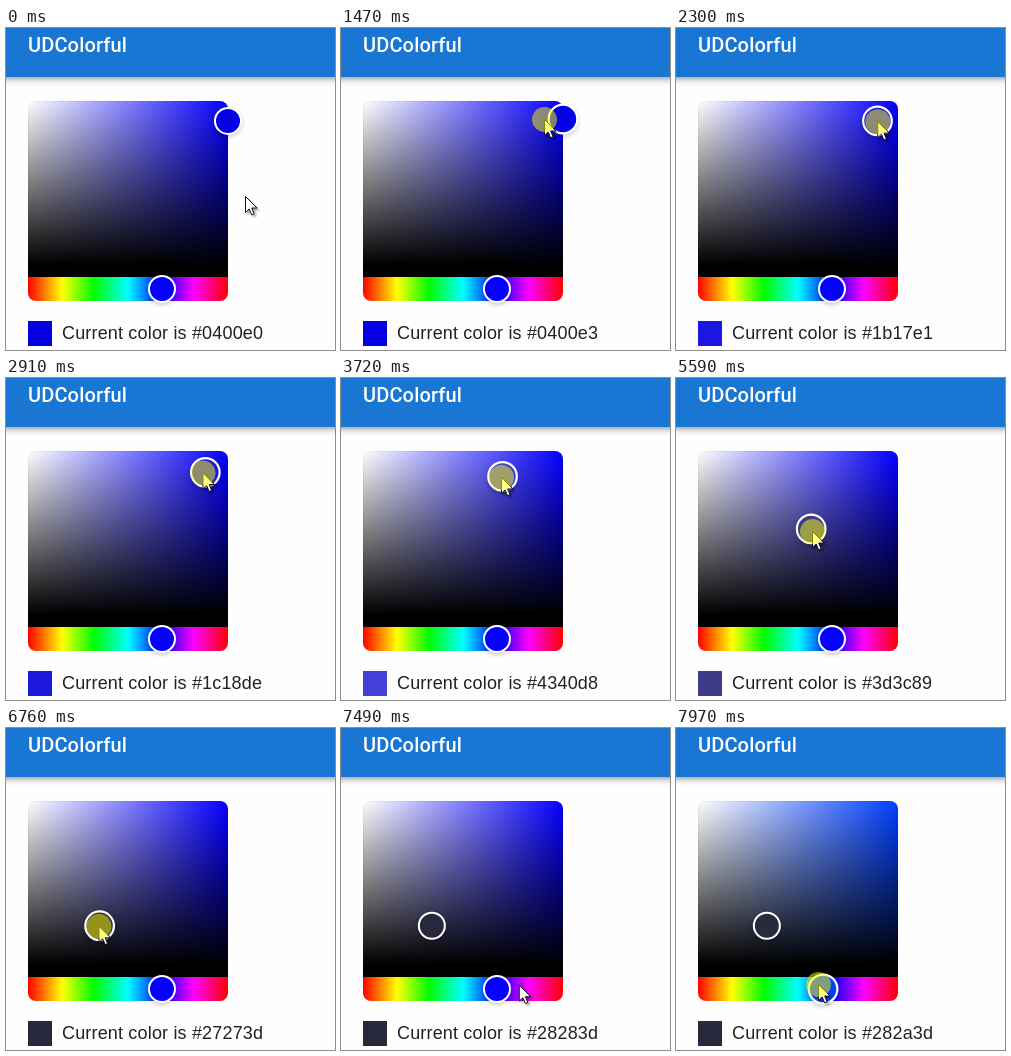
These frames come from a looping animation (329x322 px, 8 s). An HTML page:

```html
<!DOCTYPE html>
<html lang="en">
<head>
<meta charset="utf-8">
<title>UDColorful</title>
<style>
  html, body { margin: 0; width: 100%; height: 100%; overflow: hidden; background: #fefefe; }
  #stage { position: relative; width: 329px; height: 322px; overflow: hidden; }
  #stage > * { position: absolute; box-sizing: border-box; }
  header {
    left: -20px; top: 0; width: 369px; height: 49px; padding: 1px 0 0 42px;
    background: #1976d2; color: #fff;
    font: 500 20px/32px Roboto, sans-serif; letter-spacing: .0075em;
    box-shadow: 0 2px 4px -1px rgba(0,0,0,.2), 0 4px 5px rgba(0,0,0,.14), 0 1px 10px rgba(0,0,0,.12);
  }
  #field {
    left: 22px; top: 73px; width: 200px; height: 176px; border-radius: 8px 8px 0 0;
    background-image: linear-gradient(0deg, #000 12px, transparent),
                      linear-gradient(90deg, #fff, rgba(255,255,255,0));
    box-shadow: inset 0 0 0 1px rgba(0,0,0,.05);
  }
  #hue {
    left: 22px; top: 249px; width: 200px; height: 24px; border-radius: 0 0 8px 8px;
    background: linear-gradient(90deg, #f00 0%, #ff0 17%, #0f0 33%, #0ff 50%, #00f 67%, #f0f 83%, #f00 100%);
  }
  .knob {
    left: -14px; top: -14px; width: 28px; height: 28px; border-radius: 50%;
    border: 2px solid #fff; box-shadow: 0 2px 4px rgba(0,0,0,.2);
  }
  #swatch { left: 22px; top: 293px; width: 24px; height: 25px; }
  #label {
    left: 56px; top: 293px; white-space: nowrap; color: rgba(0,0,0,.87);
    font: 18px/24px "Liberation Sans", Arial, sans-serif; letter-spacing: .00938em;
  }
  #cursor { left: -.5px; top: 0; overflow: visible; filter: drop-shadow(2px 2px 1px rgba(0,0,0,.35)); }
  #press { left: -12.5px; top: -12.5px; width: 25px; height: 25px; border-radius: 50%; background: rgba(255,255,0,.5); }
</style>
</head>
<body>
<div id="stage">
  <header>UDColorful</header>
  <div id="field"></div>
  <div id="hue"></div>
  <div id="hueKnob" class="knob"></div>
  <div id="knob" class="knob"></div>
  <div id="swatch"></div>
  <div id="label"></div>
  <svg id="cursor" width="13" height="20">
    <path d="M.5 .5V16.5L4.2 13L6.6 18.8L9.1 17.8L6.7 12H12Z" fill="#fff" stroke="#111"/>
  </svg>
  <div id="press"></div>
</div>
<script>
const LOOP = 8000, STEP = 72.2, START = 10;
const DRAG = 15, DROP = 96, HUE_DRAG = 108;

// Turning points of the mouse: step, x, y
const turns = [
  [0, 239, 168], [2, 226, 69], [19, 222, 91], [20, 203, 91],
  [38, 200.38, 94.22], [48, 163, 98], [62, 136.7, 105.8], [71, 128, 128],
  [75, 134.41, 148.89], [77, 136, 153], [84, 128, 158], [91, 94.13, 197.77],
  [95, 90.85, 197.77], [99, 72, 228], [104, 190, 260],
  [108, 152.17, 257], [110, 142, 256]
];

const $ = id => document.getElementById(id);
const clamp = (v, lo, hi) => Math.min(hi, Math.max(lo, v));
const ease = k => k * k * (3 - 2 * k);

function mouse(n) {
  let i = 1;
  while (i < turns.length - 1 && turns[i][0] < n) i++;
  const [a, ax, ay] = turns[i - 1], [b, bx, by] = turns[i];
  const k = ease(clamp((n - a) / (b - a), 0, 1));
  return { x: ax + (bx - ax) * k, y: ay + (by - ay) * k };
}

function picked(n) {
  const p = n < DRAG ? { x: 222, y: 92.94 } : mouse(Math.min(n, DROP - 1));
  return { x: clamp(p.x, 22, 222), y: clamp(p.y, 73, 237) };
}

const hueX = n => n < HUE_DRAG ? 155.972 : mouse(n).x;
const hueAt = n => (hueX(n) - 22) / 200 * 360;

function hex(h, s, v) {
  const channel = c => {
    const k = (c + h / 60) % 6;
    const f = v - v * s * clamp(Math.min(k, 4 - k), 0, 1);
    return Math.round(f * 255).toString(16).padStart(2, "0");
  };
  return "#" + channel(5) + channel(3) + channel(1);
}

function colorAt(n) {
  const p = picked(n);
  return hex(hueAt(n), (p.x - 22) / 200, 1 - (p.y - 73) / 164);
}

function place(el, x, y, scale = 1) {
  el.style.transform = `translate(${x}px, ${y}px) scale(${scale})`;
}

// The knobs trail the mouse by one step, the label by two
function draw(t) {
  const n = Math.max(0, Math.floor((t - START) / STEP));
  const dragging = n >= DRAG && n < DROP, hueDragging = n >= HUE_DRAG;
  const m = mouse(n), p = picked(n - 1);
  const pure = hex(hueAt(n - 1), 1, 1), color = colorAt(n - 2);

  place($("cursor"), m.x, m.y);
  place($("press"), m.x, m.y);
  $("press").style.visibility = dragging || hueDragging ? "visible" : "hidden";
  place($("knob"), p.x, p.y, dragging ? 1.1 : 1);
  place($("hueKnob"), hueX(n - 1), 261, hueDragging ? 1.1 : 1);
  $("knob").style.backgroundColor = color;
  $("hueKnob").style.backgroundColor = pure;
  $("field").style.backgroundColor = pure;
  $("swatch").style.backgroundColor = color;
  $("label").textContent = "Current color is " + color;
}

const begin = performance.now();
function tick() {
  draw((performance.now() - begin) % LOOP);
  requestAnimationFrame(tick);
}
tick();
</script>
</body>
</html>
```
